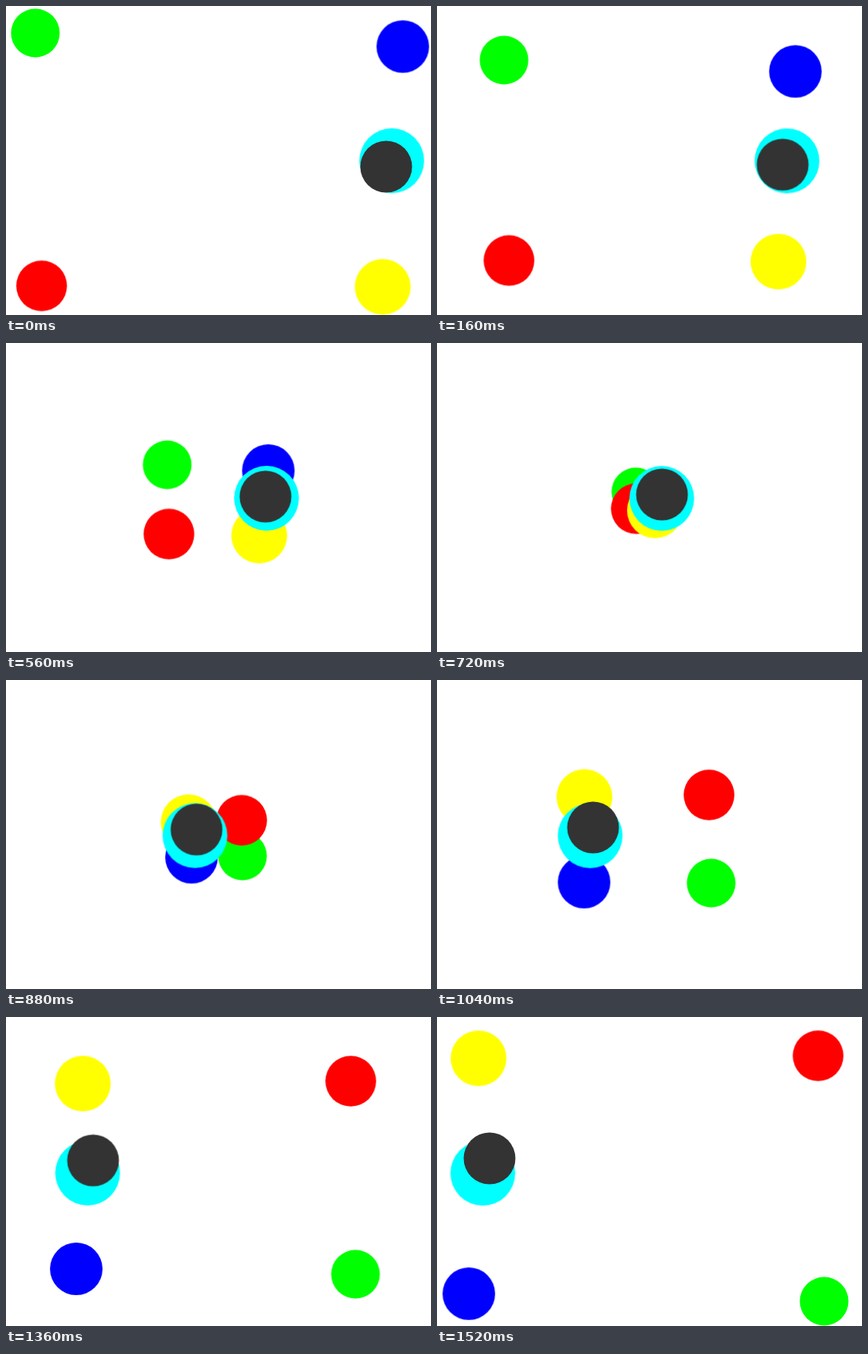
Animation, 550 px wide and 400 px high, one loop 1.6 s. Source, as an HTML page:

```html
<!DOCTYPE html>
<html lang="en">
<head>
<meta charset="utf-8">
<title>Crossing circles</title>
<style>
  html, body { margin: 0; width: 100%; height: 100%; overflow: hidden; background: #fff; }
  svg { display: block; width: 550px; height: 400px; }
  /* 20 held poses of 80 ms, both end points included */
  circle { animation: cross 1600ms steps(20, jump-none) infinite; }
  @keyframes cross {
    from { transform: translate(var(--x0), var(--y0)); }
    to { transform: translate(var(--x1), var(--y1)); }
  }
  .green  { fill: #0f0; --x0: 38px; --y0: 35px; --x1: 501px; --y1: 368px; }
  .red    { fill: #f00; --x0: 46.1px; --y0: 362.3px; --x1: 493.2px; --y1: 50.2px; }
  .blue   { fill: #00f; --x0: 513.5px; --y0: 52.5px; --x1: 41.2px; --y1: 358.2px; }
  .yellow { fill: #ff0; --x0: 487.5px; --y0: 363.5px; --x1: 53.7px; --y1: 53.5px; }
  .cyan   { fill: #0ff; --x0: 499.2px; --y0: 200.3px; --x1: 59.3px; --y1: 202.2px; }
  .dark   { fill: #333; --x0: 492px; --y0: 208px; --x1: 68px; --y1: 183px; }
</style>
</head>
<body>
<svg viewBox="0 0 550 400">
  <circle class="green" r="31.5"/>
  <circle class="red" r="32.8"/>
  <circle class="blue" r="34"/>
  <circle class="yellow" r="36.1"/>
  <circle class="cyan" r="41.9"/>
  <circle class="dark" r="33.5"/>
</svg>
</body>
</html>
```
